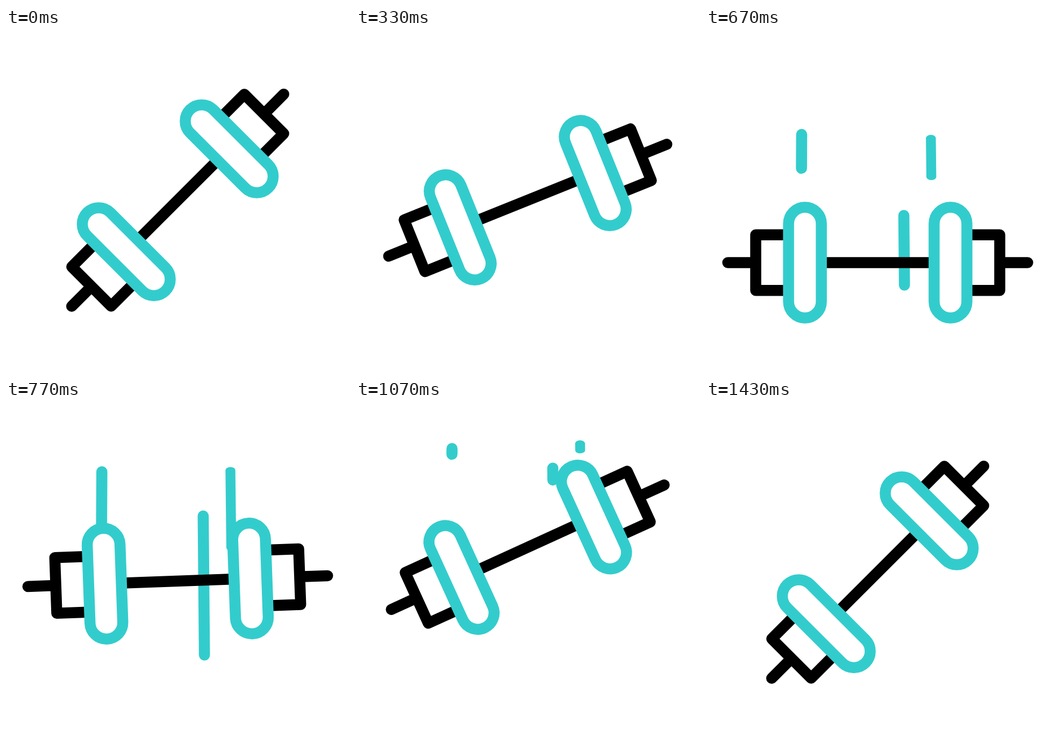
Write an HTML page with a canvas that moves like this. It is 640x640 px and loops after 1670 ms.

```html
<!DOCTYPE html>
<html lang="en">
<head>
<meta charset="utf-8">
<title>Barbell</title>
<style>
html, body { margin: 0; height: 100%; overflow: hidden; background: #fff; }
canvas { display: block; }
</style>
</head>
<body>
<canvas id="stage" width="640" height="640"></canvas>
<script>
const ctx = document.getElementById('stage').getContext('2d');
const LOOP = 1670, TEAL = '#33cccc';

// Eased progress of step n between two steps
function ease(n, from, to) {
  const u = Math.min(1, Math.max(0, (n - from) / (to - from)));
  return u * u * (3 - 2 * u);
}

// Line from (x0, y0) to (x1, y1), trimmed to the part between tail and head
function trail(n, x0, y0, x1, y1, half = 10.3, cap = 10.3) {
  const head = ease(n, 15.25, 26.8), tail = ease(n, 22.3, 33.75);
  if (head <= tail) return;
  const length = Math.hypot(x1 - x0, y1 - y0);
  ctx.save();
  ctx.translate(x0, y0);
  ctx.rotate(Math.atan2(x1 - x0, y0 - y1));
  ctx.beginPath();
  ctx.roundRect(-half, -length * head - cap, 2 * half,
    length * (head - tail) + 2 * cap, { x: half, y: cap });
  ctx.fillStyle = TEAL;
  ctx.fill();
  ctx.restore();
}

function barbell(y, degrees) {
  ctx.save();
  ctx.translate(319.5, y);
  ctx.rotate(degrees * Math.PI / 180);
  ctx.lineWidth = 20.5;
  ctx.lineCap = ctx.lineJoin = 'round';

  ctx.strokeStyle = '#000';
  ctx.beginPath();
  ctx.moveTo(-135, 0);
  ctx.lineTo(135, 0);
  for (const side of [-1, 1]) {
    ctx.moveTo(side * 279, 0);
    ctx.lineTo(side * 227, 0);
    ctx.moveTo(side * 150, -51.8);
    ctx.lineTo(side * 227, -51.8);
    ctx.lineTo(side * 227, 51.8);
    ctx.lineTo(side * 150, 51.8);
  }
  ctx.stroke();

  ctx.strokeStyle = TEAL;
  ctx.fillStyle = '#fff';
  for (const side of [-1, 1]) {
    ctx.beginPath();
    ctx.roundRect(side * 135.4 - 30.5, -103, 61, 206, 30.5);
    ctx.fill();
    ctx.stroke();
  }
  ctx.restore();
}

function draw(time) {
  // 30 steps per second on a 10 ms clock
  const n = Math.floor((Math.floor(time / 10) * 10 + 3.4) * 0.03);
  const angle = -45 * (1 - ease(n, 0.19, 19.47) + ease(n, 20.1, 42.55));
  const y = 320.4 + 116.2 * ease(n, 12.6, 19.6)
    - 235 * ease(n, 19.9, 26.8) + 118.8 * ease(n, 26.9, 35.8);

  ctx.fillStyle = '#fff';
  ctx.fillRect(0, 0, 640, 640);
  trail(n, 177.6, 261, 178.6, 90.3);
  trail(n, 369.2, 478.3, 366.1, 126.7);
  trail(n, 419.2, 277, 416.9, 81, 9.2, 6);
  barbell(y, angle);
}

const start = performance.now();
function tick() {
  draw((performance.now() - start) % LOOP);
  requestAnimationFrame(tick);
}
tick();
</script>
</body>
</html>
```
